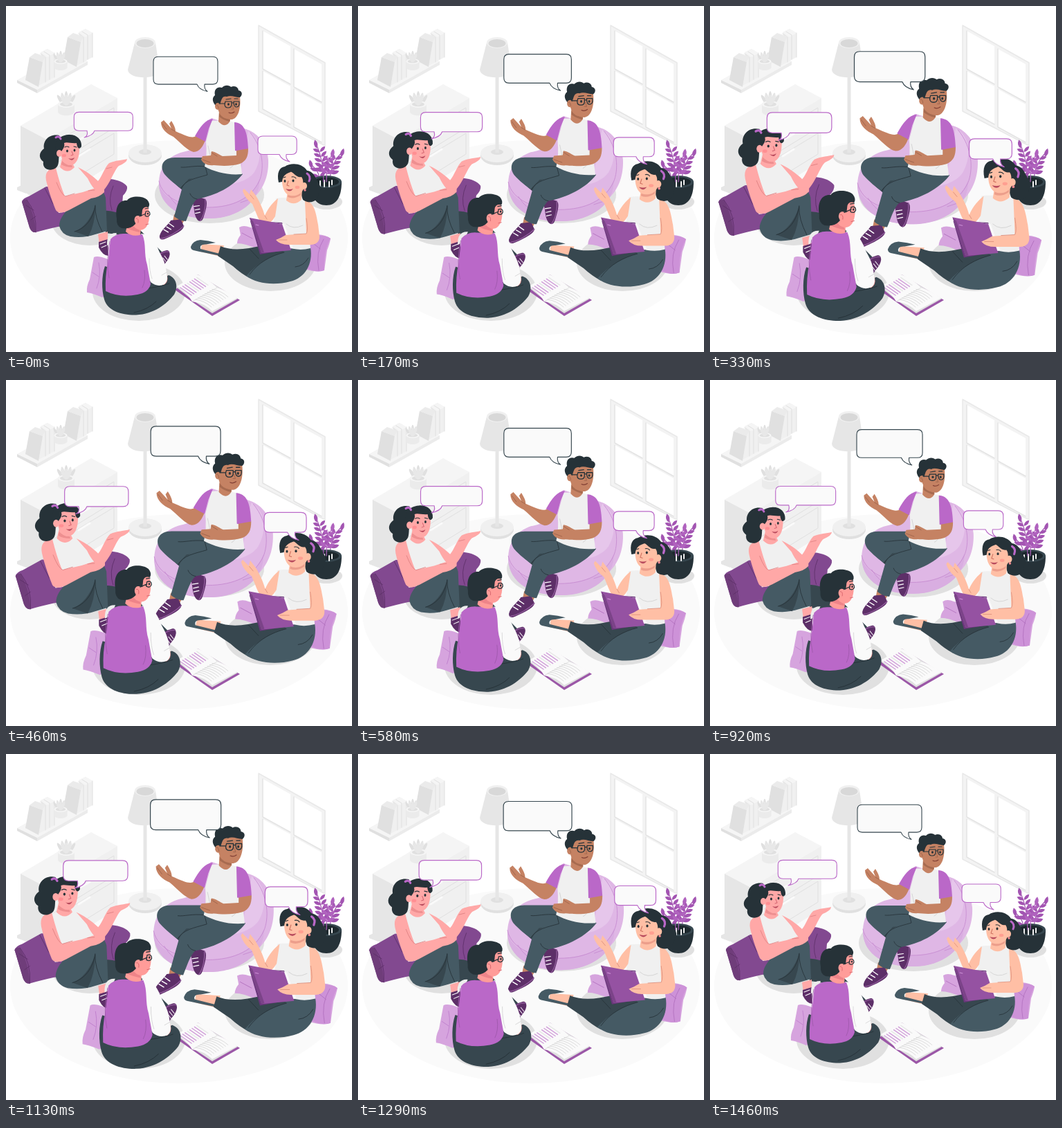
Animation, 500 px wide and 500 px high, one loop 1500 ms. Source, as an HTML page with a canvas:

```html
<!DOCTYPE html>
<html lang="en">
<head>
<meta charset="utf-8">
<title>Group conversation</title>
<style>
html, body { margin: 0; width: 100%; height: 100%; overflow: hidden; background: #fff; }
canvas { display: block; width: 500px; height: 500px; }
</style>
</head>
<body>
<canvas id="stage"></canvas>
<script>
const canvas = document.getElementById('stage');
const ctx = canvas.getContext('2d');
const ratio = window.devicePixelRatio || 1;
canvas.width = canvas.height = 500 * ratio;

const LOOP = 1500;
const PURPLE = '#ba68c8', DARK = '#263238', SLATE = '#455a64', NIGHT = '#37474f';
const PLUM = '#824990', SHOE = '#5d2f68', SHIRT = '#f0f0f0', SHADE = '#e0e0e0';
const ROSE = '#ffa8a7', PEACH = '#ffbfa5', BROWN = '#c58263', LILAC = '#d6a4de';

const cache = new Map();
function path(d) {
  if (!cache.has(d)) cache.set(d, new Path2D(d));
  return cache.get(d);
}
function fill(color, d) {
  ctx.fillStyle = color;
  ctx.fill(path(d));
}
function line(color, width, d) {
  ctx.strokeStyle = color;
  ctx.lineWidth = width;
  ctx.stroke(path(d));
}
function oval(color, x, y, rx, ry, turn = 0) {
  ctx.fillStyle = color;
  ctx.beginPath();
  ctx.ellipse(x, y, rx, ry, turn, 0, 7);
  ctx.fill();
}
function scaled(x, y, k, draw) {
  ctx.save();
  ctx.translate(x, y);
  ctx.scale(k, k);
  ctx.translate(-x, -y);
  draw();
  ctx.restore();
}

// Two eased beats per loop, as [time, strength].
const beats = [[0, 0], [345, 1], [810, 0], [1165, 1], [1470, 0], [1500, 0]];
function beat(t) {
  const i = beats.findIndex(b => b[0] > t);
  const [t0, a] = beats[i - 1], [t1, b] = beats[i];
  return a + (b - a) * (1 - Math.cos(Math.PI * (t - t0) / (t1 - t0))) / 2;
}

function books(x, y) {
  ctx.save();
  ctx.translate(x, y);
  fill('#f0f0f0', 'M22,-1 L32,-6 L42,0 V35 L29,42 L19,47 L25,11 Z');
  fill('#f5f5f5', 'M22,-1 L32,-6 L42,0 L32,6 Z');
  line(SHADE, 1, 'M29,42 V6 L22,1 M35,38 V3 L27,-2 M42,35 V0');
  fill('#ebebeb', 'M6,6 L14,0 L29,5 L25,13 Z');
  fill(SHADE, 'M6,6 L25,13 L19,49 L0,39 Z');
  ctx.restore();
}
function greyPot(x, y, k) {
  ctx.save();
  ctx.translate(x, y);
  ctx.scale(k, k);
  for (let i = -2; i <= 2; i++) oval(i % 2 ? '#e6e6e6' : SHADE, i * 3.8, -9 + Math.abs(i) * 2, 2.5, 10, i * 0.28);
  fill('#ebebeb', 'M-12,0 V11 C-10,18 10,18 12,11 V0 Z');
  oval('#f5f5f5', 0, 0, 12, 5);
  oval(SHADE, 0, 0, 9, 3.2);
  for (let i = -1; i <= 1; i++) oval('#e8e8e8', i * 4, -6, 2.5, 8, i * 0.4);
  ctx.restore();
}

function room() {
  ctx.fillStyle = '#fff';
  ctx.fillRect(0, 0, 500, 500);
  oval('#fafafa', 250, 335, 244, 141);

  fill('#f5f5f5', 'M16,107 L90,66 L118,80 L45,121 Z');
  fill(SHADE, 'M16,107 L45,121 V126 L16,111 Z');
  fill('#ebebeb', 'M45,121 L118,80 V85 L45,126 Z');
  books(28, 68);
  books(83, 39);
  greyPot(79, 80, 0.8);

  fill('#f5f5f5', 'M21,173 L123,113 L161,133 L59,193 Z');
  fill('#e6e6e6', 'M21,173 L59,193 V287 L21,266 Z M16,262 L29,256 V271 L16,266 Z');
  fill('#f0f0f0', 'M59,193 L161,133 V224 L59,287 Z');
  line('#e0e0e0', 1, 'M65,201 L156,147 V176 L65,232 Z M65,239 L156,184 V214 L65,270 Z');
  line('#fafafa', 3, 'M105,194 L121,185 M105,217 L121,207');
  greyPot(87, 142, 1);

  oval('#e0e0e0', 201, 216, 24, 14);
  oval('#f0f0f0', 201, 213, 24, 13);
  oval('#e0e0e0', 201, 211, 9, 4);
  fill('#e6e6e6', 'M198.5,98 H203.5 V212 H198.5 Z');
  fill('#e6e6e6', 'M186,53 L176,92 C177,107 221,107 222,92 L216,53 Z');
  oval('#f0f0f0', 201, 53, 15, 8);
  oval('#d8d8d8', 201, 54, 12.5, 6);

  fill('#f3f3f3', 'M365,28 L461,82 V202 L365,152 Z');
  line('#e9e9e9', 1.5, 'M365,28 L461,82 V202 L365,152 Z');
  for (const [x, y] of [[371, 36], [416, 62], [371, 94], [416, 120]]) {
    ctx.save();
    ctx.translate(x, y);
    fill('#fff', 'M0,0 L40,22 V77 L0,55 Z');
    line('#e4e4e4', 1.5, 'M0,0 V55 L40,77');
    ctx.restore();
  }

  for (const [x, y, rx, ry] of [[294, 273, 79, 41], [121, 311, 55, 35], [192, 413, 67, 42], [382, 371, 66, 41], [463, 283, 23, 11]])
    oval(SHADE, x, y, rx, ry);
  plant();
  floorBook();
}

function leaf(color, x, y, length, turn) {
  ctx.save();
  ctx.translate(x, y);
  ctx.rotate(turn);
  ctx.scale(length / 12, length / 12);
  fill(color, 'M0,0 Q-5,-6 0,-12 Q5,-6 0,0 Z');
  ctx.restore();
}
function sprig(x, y, tipX, tipY, pairs, color) {
  const lean = (tipX - x) * 0.02;
  line(color, 1.2, `M${x},${y} Q${x},${(y + tipY) / 2} ${tipX},${tipY + 6}`);
  for (let i = 0; i < pairs; i++) {
    const p = 0.25 + 0.6 * i / pairs;
    const px = x + (tipX - x) * p * p, py = y + (tipY - y) * p;
    for (const side of [-1, 1]) leaf(color, px, py, 14 - p * 4, side * 0.95 + lean);
  }
  leaf(color, tipX, tipY + 11, 13, lean);
}
function plant() {
  sprig(468, 254, 484, 207, 4, '#a355b2');
  sprig(454, 256, 442, 224, 2, '#a355b2');
  fill(DARK, 'M441,254 C441,276 447,288 463,288 C478,288 485,275 485,254 Z');
  oval(NIGHT, 463, 254, 22, 9);
  oval('#1d282d', 463, 254, 18, 6.5);
  line('#f0f0f0', 2, 'M454,253 V260 M460,252 V261 M467,254 V261 M471,252 V258');
  sprig(459, 254, 449, 195, 5, '#a355b2');
  sprig(463, 254, 471, 208, 3, '#b062be');
}
function floorBook() {
  fill('#9b57a7', 'M244,410 L277,388 L338,425 L298,448 Z');
  fill(SHADE, 'M247,407 L277,388 L335,423 L298,444 L271,426 Z');
  fill('#fafafa', 'M247,405 L276,388 Q291,393 305,407 Q320,412 334,422 L298,441 Q286,429 269,427 Q263,416 247,405 Z');
  line(SHADE, 1, 'M269,427 L305,407');
  for (let i = 0; i < 8; i++) {
    const x = i * 3.4, y = i * -2.1;
    line(i % 4 < 3 ? '#d2a1da' : '#e7e7e7', 1.5, `M${252 + x},${407 + y} l16,11`);
    line('#d5d5d5', 0.8, `M${274 + x},${424 + y} q13,2 23,11`);
  }
}

function sneaker(x, y, turn, length = 36) {
  ctx.save();
  ctx.translate(x, y);
  ctx.rotate(turn);
  ctx.scale(length / 36, 1);
  fill(SHOE, 'M-18,3 C-12,-5 -2,-6 5,-11 C12,-9 14,-7 18,-8 V4 C16,9 4,10 -12,10 C-18,10 -20,7 -18,3 Z');
  line('#8f5a9a', 1.3, 'M-18,7 C-8,10 8,8 18,4');
  line('#fff', 1.3, 'M-9,-3 L-5,3 M-4,-5 L0,1 M1,-8 L5,-1');
  ctx.restore();
}

function manOnBag() {
  fill('#dfb7e5', 'M297,162 C287,168 287,194 276,203 C267,209 260,210 252,212 C232,219 221,234 221,257 C223,291 257,308 294,307 C325,306 350,293 358,277 C374,263 380,242 379,222 C377,197 361,182 347,178 Z');
  fill('#e6c6eb', 'M350,181 C370,192 371,220 359,240 C346,258 310,263 285,255 L340,235 Z');
  fill('#d9aee1', 'M221,253 C222,277 254,292 291,291 C329,290 356,277 366,250 C369,283 333,308 293,307 C247,308 219,285 221,253 Z');
  line('#c68ad0', 0.8, 'M221,253 C226,278 258,291 292,291 C328,291 354,278 366,253 C373,237 373,207 353,183 M235,273 C242,284 250,291 260,297 M339,284 L351,280');

  fill(BROWN, 'M269,276 L282,272 L283,288 L273,288 Z M243,301 L259,307 L253,318 L240,316 Z');
  sneaker(279, 293, -1.25, 32);
  fill(NIGHT, 'M226,232 C230,248 251,262 269,278 L283,276 L291,238 Z');
  fill(SLATE, 'M295,219 L244,219 C227,219 221,231 229,243 C237,252 245,258 252,263 L264,250 L300,245 Z');
  sneaker(238, 322, -0.42, 38);
  fill(SLATE, 'M290,231 L336,238 L342,243 C328,261 303,274 276,279 C269,285 265,299 260,311 C254,311 248,308 243,304 L254,265 C259,252 272,246 291,244 Z');
  line(DARK, 0.8, 'M253,263 C260,251 274,249 291,244 L288,232 C272,230 261,234 253,233 M276,279 C270,278 267,274 266,271');

  fill(BROWN, 'M276,187 C270,192 263,189 245,181 C245,176 242,171 239,166 L236,170 L239,177 L228,165 L224,168 C224,178 233,185 242,189 C253,198 262,209 271,211 C280,211 285,202 288,194 Z');
  line('#9c624a', 0.8, 'M239,178 L244,181 M226,170 L232,178');
  fill(SHIRT, 'M297,166 Q317,164 334,169 L337,209 L341,243 C321,245 302,240 287,232 Q291,217 289,196 Z');
  line('#d3d3d3', 0.9, 'M292,202 L295,216 M334,213 C334,223 330,231 324,234');
  fill(PURPLE, 'M299,163 C288,164 281,174 273,188 L288,196 L293,177 Z M330,168 C343,169 349,179 350,206 Q341,211 331,209 Z');
  fill(BROWN, 'M333,209 L350,206 C350,218 347,224 338,228 C325,232 309,231 300,230 C292,231 285,228 282,222 L284,217 L296,216 L297,210 C304,211 308,215 313,217 L333,216 Z');
  line('#9c624a', 0.8, 'M284,222 L295,226 M297,212 L305,217');

  fill(BROWN, 'M308,151 L307,167 Q317,178 324,166 L323,153 Z');
  fill('#a76b50', 'M308,155 Q315,165 324,162 L323,167 Q314,165 308,160 Z');
  fill(BROWN, 'M306,132 C306,120 337,118 338,131 C340,149 335,163 326,164 C314,164 306,154 306,146 Z');
  fill(DARK, 'M304,145 C297,138 298,132 302,129 C300,120 306,116 312,118 C317,113 323,115 325,117 C331,114 336,118 336,122 C342,123 342,129 338,132 C331,132 325,128 319,131 C311,129 311,138 308,146 Z');
  oval(BROWN, 306, 145, 4, 5);
  line('#9c624a', 0.8, 'M304,143 Q307,143 307,148 M327,143 L329,149 L326,149');
  line(DARK, 1.2, 'M308,141 L316,141 M317,138 H326 V142 Q326,147 321,147 Q316,147 316,142 Z M329,138 H337 Q338,146 333,146 Q329,146 329,138 M326,140 H329 M318,135 L325,134 M330,134 L335,134');
  oval(DARK, 321.5, 142, 1.5, 1.7);
  oval(DARK, 332.5, 142, 1.4, 1.7);
  line('#803f34', 1.1, 'M322,154 Q326,156 330,153');
}

function leftWoman() {
  fill(PLUM, 'M23,283 Q24,278 33,275 L58,261 L118,262 L150,250 Q169,252 175,261 Q176,267 169,274 L166,310 L75,319 Q57,323 43,327 Q37,328 34,320 Z');
  fill('#6f3d7a', 'M23,283 Q25,279 30,280 Q42,301 43,327 Q37,328 34,320 Z');
  line('#5d2f68', 0.8, 'M30,280 Q45,299 43,327 M29,288 L40,295 M36,309 L43,304 M56,263 L68,286 M155,260 Q147,278 153,295');

  fill(NIGHT, 'M142,296 Q155,294 176,306 L225,355 L219,364 L160,330 L144,328 Z');
  sneaker(227, 365, 2.85, 22);
  fill(ROSE, 'M133,330 L147,326 V345 L135,345 Z');
  fill(SHOE, 'M134,341 L147,337 L148,361 Q140,361 134,349 Z');
  line('#fff', 1, 'M136,344 L144,341 M138,349 L145,346');

  fill(SHIRT, 'M72,235 L94,229 C108,235 121,242 129,259 L124,276 Q105,296 76,299 L70,266 Z');
  fill(ROSE, 'M104,233 C119,240 129,249 133,253 C139,246 142,234 149,227 C158,223 168,223 175,221 Q175,226 163,231 C156,237 150,260 137,270 Q127,268 118,249 Z');
  fill(SLATE, 'M77,318 C77,300 100,284 119,270 Q139,258 144,277 L146,325 L129,330 Q111,336 93,333 Q80,330 77,318 Z');
  fill(NIGHT, 'M99,326 Q119,318 129,289 Q129,315 119,333 Z');
  line(DARK, 0.8, 'M129,288 C126,307 116,321 99,326 M129,289 Q128,305 139,326');
  fill(ROSE, 'M72,234 C61,235 56,240 58,252 C62,270 68,285 72,295 Q77,302 91,295 L123,278 Q136,276 142,269 L142,264 L126,264 L111,269 L85,275 Q78,258 72,234 Z');
  line('#dd7f80', 0.8, 'M73,255 Q80,273 86,275 L99,271 M119,267 L128,266 M145,235 L153,233');

  fill(DARK, 'M77,187 C62,184 53,195 55,206 C47,212 47,220 54,225 C52,236 64,240 72,234 C79,229 74,216 79,210 Z');
  fill(ROSE, 'M81,220 L78,233 Q89,244 99,233 L95,225 Z');
  fill('#ee8f90', 'M81,224 Q88,231 95,230 L96,233 Q86,233 80,229 Z');
  fill(ROSE, 'M79,200 C83,187 105,191 106,202 C107,218 102,230 93,230 C83,230 77,218 79,200 Z');
  fill(DARK, 'M75,215 C67,199 75,187 90,186 C102,185 110,193 109,203 C106,208 103,206 102,198 C95,199 88,196 84,198 C86,206 79,208 79,214 Z');
  line(PURPLE, 3, 'M72,190 Q77,187 79,192');
  oval(ROSE, 77, 213, 4, 5);
  oval('#ff8f93', 84, 216, 3, 2.2);
  oval(DARK, 88.5, 209.5, 1.5, 1.9);
  oval(DARK, 99, 208.5, 1.4, 1.9);
  line(DARK, 1.1, 'M85,204 Q88,202 91,204 M98,203 L102,204');
  line('#d56873', 1, 'M95,210 L97,215 L94,216');
  fill('#b94c5e', 'M90,220 Q95,222 99,219 Q96,226 90,220 Z');
}

function boy() {
  fill(LILAC, 'M127,363 Q132,360 145,365 L170,377 L160,415 L139,421 Q125,415 117,414 Q116,405 121,395 Z');
  line('#bd7ccb', 0.8, 'M134,371 Q138,390 131,408 M125,385 L134,391');
  fill(NIGHT, 'M143,376 C138,390 138,410 142,424 C147,441 168,447 188,446.5 C214,445 232,431 243,417 C249,407 247,393 235,389 L213,399 Z');
  line(DARK, 0.9, 'M205,408 Q226,405 236,401 M185,443 Q205,439 217,427');
  fill('#ff9c99', 'M219,379 Q229,378 233,390 Q235,399 228,403 L212,400 Z');
  fill('#fafafa', 'M195,329 C211,330 216,341 222,356 C230,370 231,377 232,386 Q235,397 229,402 Q219,407 209,399 L198,354 Z');
  line('#d8d8d8', 0.9, 'M207,365 Q207,384 211,394 M225,389 L232,385');
  fill('#ededed', 'M160,328 Q145,327 146,346 L154,342 Z');
  fill(PURPLE, 'M151,337 Q159,328 172,329 L197,330 C203,344 199,358 204,374 L209,402 Q206,414 190,417 Q164,422 144,412 Q143,390 147,372 Z');
  line('#9d58aa', 0.8, 'M150,340 Q144,371 149,393 M200,382 Q202,397 197,407');

  fill('#ff9c99', 'M176,313 L173,326 Q181,334 194,331 L195,320 Z');
  fill('#ee8489', 'M176,315 L192,322 L194,327 Q182,325 175,321 Z');
  fill('#ff9c99', 'M185,293 L204,286 Q208,298 207,306 C206,318 200,326 191,323 Q183,321 182,308 Z');
  fill(DARK, 'M160,307 C157,288 165,280 175,281 C180,274 197,274 204,280 Q209,286 206,291 Q199,289 197,295 L196,304 L190,303 L187,315 Q180,323 167,321 Q159,318 160,307 Z');
  oval('#ff9c99', 190, 309, 4.5, 6);
  line('#d7656d', 0.9, 'M188,307 Q192,306 191,313 M202,316 L206,315');
  line(DARK, 1.2, 'M193,304 L202,300 M202,297 Q208,295 208,301 Q206,306 201,303 Z M201,293 L206,292');
  oval(DARK, 205, 300, 1.1, 1.6);
}

function rightWoman() {
  fill(LILAC, 'M337,320 Q343,316 353,320 L401,326 L450,330 Q463,331 469,336 Q468,343 464,353 L460,382 Q450,386 431,380 L362,351 Q346,343 334,343 Q334,337 339,331 Z');
  fill('#cd92d8', 'M441,332 Q462,330 469,336 Q459,353 460,382 Q449,386 435,379 Z');
  line('#b06fbd', 0.8, 'M459,337 Q447,356 452,382 M444,343 L454,351 M341,328 L356,336');

  fill(PEACH, 'M283,344 L315,346 L310,362 L281,355 Z');
  fill(SLATE, 'M267,348 Q270,339 281,338 Q293,339 303,342 L289,344.5 Q279,344 281,351 L309,358 L309,361 Q285,356 271,353 Q267,352 267,348 Z');
  fill(NIGHT, 'M310,347 Q326,354 351,350 L398,341 L422,365 Q381,375 352,393 Q340,387 328,376 L306,361 Z');
  fill(SLATE, 'M396,348 L440,349 C444,373 432,393 411,398 C389,404 363,402 347,390 C361,374 382,361 402,356 Z');
  line(DARK, 0.8, 'M402,356 C383,361 365,370 352,388 M437,364 Q430,376 418,377 M352,351 L365,365');

  fill(SHIRT, 'M390,278 Q407,275 433,282 Q441,302 437,318 L440,350 Q421,355 404,347 L386,322 Z');
  line('#d4d4d4', 0.9, 'M405,315 Q415,324 429,317');
  fill(PEACH, 'M393,278 C382,287 377,296 374,303 C371,292 366,282 361,274 L354,265 L352,272 L344,264 L342,267 Q345,278 356,286 C363,302 365,311 371,314 Q380,319 389,304 Z');
  line('#db8e7c', 0.8, 'M353,273 L358,279 M374,303 L377,308');
  fill('#69367a', 'M353,311 L399,313 L413,351 L367,359 Z');
  fill('#fafafa', 'M359,310 L402,315 L415,350 L369,356 Z');
  fill('#9552a2', 'M352,306 L399,315 L412,353 L369,357 Z');
  fill('#7b4388', 'M352,306 L357,311 L373,356 L369,357 Z');
  line('#cd91d6', 1, 'M361,316 L365,317');
  fill(PEACH, 'M432,281 C446,283 448,300 451,316 L453,333 Q453,344 441,345 L408,345 Q396,345 390,338 L397,335 L404,331 L434,329 L433,305 Z');
  line('#db8e7c', 0.8, 'M434,307 Q437,324 434,329 L416,330 M394,338 L406,338');

  fill(DARK, 'M427,238 C444,235 447,248 451,255 Q458,264 452,270 C452,283 438,287 429,280 Q423,265 427,238 Z');
  fill(PEACH, 'M407,268 L405,281 Q416,290 427,280 L428,264 Z');
  fill('#ec9e8b', 'M408,271 Q421,273 427,265 L426,273 Q416,280 407,276 Z');
  fill(PEACH, 'M400,242 C408,232 430,237 432,251 C433,268 423,276 411,274 C401,272 397,258 400,242 Z');
  fill(DARK, 'M394,255 C391,241 395,233 403,232 C412,226 428,227 435,238 C441,250 438,261 431,264 C428,258 431,252 427,247 C419,249 414,238 411,240 C402,243 400,247 399,254 Z');
  line(PURPLE, 3, 'M435,242 Q441,246 438,253');
  oval(PEACH, 431, 260, 4, 5);
  oval('#ef8a91', 432, 266, 1.7, 1.7);
  oval('#ff9f91', 421, 262, 3.3, 2.2);
  oval(DARK, 403, 253, 1.4, 1.9);
  oval(DARK, 415, 252.5, 1.5, 1.9);
  line(DARK, 1.1, 'M401,248 L404,247 M413,247 Q417,246 419,249');
  line('#cd705f', 1, 'M408,253 L406,259 L409,260');
  fill('#b94c5e', 'M404,264 Q410,266 415,264 Q410,271 404,264 Z');
}

function bubble(x, y, w, h, tailLeft, tailRight, tipX, tipY, color) {
  const r = x + w, b = y + h, c = 7;
  const leansLeft = tipX < tailLeft;
  const bendX = leansLeft ? tailRight - 2 : tailLeft + 3;
  const d = `M${x + c},${y} H${r - c} Q${r},${y} ${r},${y + c} V${b - c} Q${r},${b} ${r - c},${b}`
    + ` H${tailRight} Q${leansLeft ? bendX : tailRight - 1},${b + 7} ${tipX},${tipY}`
    + ` Q${leansLeft ? tailLeft + 2 : bendX},${b + 8} ${tailLeft},${b}`
    + ` H${x + c} Q${x},${b} ${x},${b - c} V${y + c} Q${x},${y} ${x + c},${y} Z`;
  fill('#fafafa', d);
  line(color, 1.1, d);
}
function bubbles() {
  bubble(98.3, 153.4, 85, 26.8, 117, 128, 113, 190, PURPLE);
  bubble(213, 73.3, 93, 39.8, 276, 287, 291, 123.5, NIGHT);
  bubble(364, 188, 56.2, 26.5, 395, 405, 410, 225, PURPLE);
}

function frame(now) {
  const k = 1 + 0.1 * beat(now % LOOP);
  ctx.setTransform(ratio, 0, 0, ratio, 0, 0);
  ctx.lineCap = ctx.lineJoin = 'round';
  room();
  scaled(300, 225, k, manOnBag);
  scaled(130.5, 280, k, leftWoman);
  scaled(182, 361, k, boy);
  scaled(368, 314, k, rightWoman);
  scaled(258, 149, k, bubbles);
}

const start = performance.now();
function tick() {
  frame(performance.now() - start);
  requestAnimationFrame(tick);
}
tick();
</script>
</body>
</html>
```
